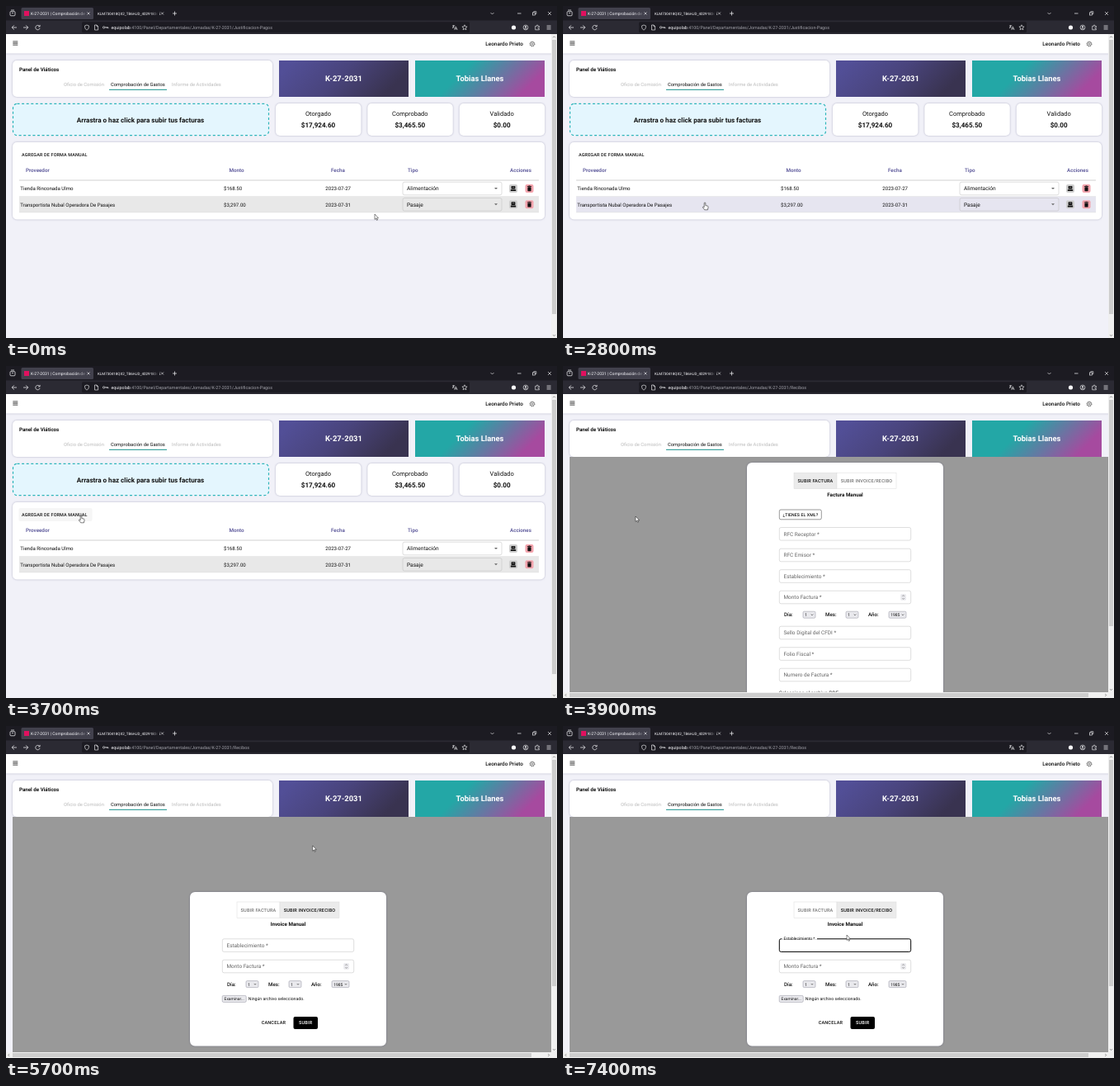
Animation, 668 px wide and 402 px high, one loop 8000 ms. Source, as an HTML page:

```html
<!DOCTYPE html>
<html lang="es">
<head>
<meta charset="utf-8">
<title>Panel de Viáticos</title>
<style>
html, body { margin: 0; width: 100%; height: 100%; overflow: hidden; background: #f1f1f8; }
svg { display: block; width: 100vw; height: 100vh; }
text { font-family: Roboto, Arial, sans-serif; text-rendering: geometricPrecision; }
.card { filter: drop-shadow(0 .4px 1px rgba(40, 40, 90, .32)); }
.caps { letter-spacing: .0285em; }
</style>
</head>
<body>
<svg id="stage" viewBox="0 0 668 402"></svg>
<script>
const LOOP = 8000, STEP = 100, FORM_AT = 3900, INVOICE_AT = 5700, FOCUS_AT = 6900;
const CODE = 'K-27-2031', INK = '#111', INDIGO = '#504c93', BAR = '#fbfbfe';
const stage = document.getElementById('stage');

// Pointer moves: start, end, target x, y and an optional bend point
const START = [447, 252];
const MOVES = [
  [0, 500, 443, 273, 446, 264],
  [700, 800, 442.5, 268.5],
  [900, 1600, 429, 272, 447, 262],
  [1900, 2800, 172, 238, 260, 330],
  [2800, 3400, 90, 183, 130, 200],
  [3500, 3700, 91, 181],
  [3800, 3900, 88, 182],
  [4100, 5000, 361, 150, 230, 215],
  [5000, 5300, 373, 140],
  [5600, 6300, 350.5, 228],
  [6300, 6500, 346, 259],
  [6500, 6700, 345, 264],
  [7000, 7400, 344, 253],
];

const clamp = v => Math.max(0, Math.min(1, v));
const smooth = v => v * v * (3 - 2 * v);

function pointerAt(t) {
  let [x, y] = START;
  for (const [t0, t1, ex, ey, bx = (x + ex) / 2, by = (y + ey) / 2] of MOVES) {
    if (t <= t0) break;
    const p = smooth(clamp((t - t0) / (t1 - t0))), q = 1 - p;
    x = q * q * x + 2 * p * q * bx + p * p * ex;
    y = q * q * y + 2 * p * q * by + p * p * ey;
  }
  return [x, y];
}

// Drawing helpers, each returns markup
const text = (x, y, s, size = 6.09, fill = INK, weight = 400, anchor = 'start', cls = '') =>
  `<text x="${x}" y="${y}" font-size="${size}" fill="${fill}" font-weight="${weight}" text-anchor="${anchor}" class="${cls}">${s}</text>`;
const mid = (x, y, s, size, fill, weight, cls) => text(x, y, s, size, fill, weight, 'middle', cls);
const rect = (x, y, w, h, r, fill, stroke = 'none', sw = .5, extra = '') =>
  `<rect x="${x}" y="${y}" width="${w}" height="${h}" rx="${r}" fill="${fill}" stroke="${stroke}" stroke-width="${sw}" ${extra}/>`;
const line = (d, stroke = BAR, sw = .7, fill = 'none') =>
  `<path d="${d}" fill="${fill}" stroke="${stroke}" stroke-width="${sw}" stroke-linejoin="round"/>`;
const ring = (x, y, r, stroke = BAR, sw = .6, fill = 'none', extra = '') =>
  `<circle cx="${x}" cy="${y}" r="${r}" fill="${fill}" stroke="${stroke}" stroke-width="${sw}" ${extra}/>`;
const card = (x, y, w, h, r = 5) => rect(x, y, w, h, r, '#fff', 'none', 0, 'class="card"');
const cross = (x, y, r) => line(`M${x - r} ${y - r}l${2 * r} ${2 * r}m0 ${-2 * r}l${-2 * r} ${2 * r}`, BAR, .6);
const chevron = (x, y, r, color, dir = 1) => line(`M${x - r} ${y - dir * r / 2}l${r} ${dir * r}l${r} ${-dir * r}`, color, .6);
const triangle = (x, y, r, color) => line(`M${x - r} ${y - r / 2}h${2 * r}l${-r} ${r}z`, 'none', 0, color);

const DEFS = `<defs>
<linearGradient id="dusk" x1="0" y1="0" x2="1" y2=".28"><stop offset=".1" stop-color="#524f97"/><stop offset=".55" stop-color="#49447c"/><stop offset="1" stop-color="#393350"/></linearGradient>
<linearGradient id="reef" x1="0" y1="0" x2="1" y2=".28"><stop offset=".42" stop-color="#23a7a6"/><stop offset="1" stop-color="#a64a9f"/></linearGradient>
<linearGradient id="fadeA"><stop offset="0" stop-color="#42414d" stop-opacity="0"/><stop offset=".8" stop-color="#42414d"/></linearGradient>
<linearGradient id="fadeB"><stop offset="0" stop-color="#1c1b22" stop-opacity="0"/><stop offset=".8" stop-color="#1c1b22"/></linearGradient>
</defs>`;

function browser(page) {
  const host = 'equipolab', path = `:4100/Panel/Departamentales/Jornadas/${CODE}/${page}`;
  return rect(0, 0, 668, 18, 0, '#1c1b22') + rect(0, 17.5, 668, 16.5, 0, '#2b2a33') +
    rect(5, 6.6, 6, 5.2, 1, 'none', BAR, .7) + line('M6 5h4M7 8.6h2') +
    rect(18.5, 2, 87.5, 14, 1.5, '#42414d') + rect(22, 6, 6, 6, 0, '#e0115f') +
    text(30, 10.9, `${CODE} | Comprobación de G`, 5, BAR) +
    rect(88, 4, 13, 10, 0, 'url(#fadeA)') + cross(100, 9, 1.5) +
    text(111, 10.9, 'KLM730418QX2_TB6HJD_402918365', 4.5, BAR) +
    rect(177, 4, 9, 10, 0, 'url(#fadeB)') + cross(189.5, 9, 1.5) +
    line('M202 9h5M204.5 6.5v5') + chevron(589.5, 9, 2, BAR) + line('M620 9h4.5') +
    rect(638.5, 8, 3, 3, 0, 'none', BAR, .6) + line('M639.8 7.9v-1.2h3v3h-1.2', BAR, .6) + cross(659, 9, 2) +
    line('M13 26H7.2m2.6-2.6L7.2 26l2.6 2.6M21 26h5.8m-2.6-2.6l2.6 2.6l-2.6 2.6') +
    line('M40.6 24.4a2.7 2.7 0 1 0 .5 2.4M41.1 22.9v2h-2') +
    rect(92, 19.3, 470, 13, 1.5, '#1c1b22') +
    line('M98 23l2.4.9v2q-.2 2.2-2.4 3.2q-2.2-1-2.4-3.2v-2z', BAR, .6) +
    line('M107.5 23h2.5l1.6 1.6v4.4h-4.1zM110 23v1.7h1.6', BAR, .6) +
    ring(118.6, 25.9, 1.2) + line('M119.9 25.9h4v1.3m-1.5-1.3v1') +
    text(127.5, 28.1, `<tspan fill="${BAR}">${host}</tspan>${path}`, 5.35, '#a3a3ab') +
    line('M541 24h3.4M542.7 23v1q0 2-1.7 3M541.7 25l2 2M543.7 29l1.7-4 1.7 4M544.4 27.7h2', BAR, .6) +
    line('M556 22.8l.9 2.1 2.2.2-1.7 1.5.5 2.2-1.9-1.2-1.9 1.2.5-2.2-1.7-1.5 2.2-.2z', BAR, .6) +
    ring(615.5, 26, 2.6, 'none', 0, BAR) +
    ring(630, 26, 2.9) + ring(630, 25.2, 1, 'none', 0, BAR) + line('M628.3 27.8q1.7-1.6 3.4 0') +
    line('M641.7 28.8v-4.4h1.6v-1q.8-1 1.5 0v1h1.6v1.6h-1q-1 .7 0 1.4h1v1.4z', BAR, .6) +
    line('M655.6 24h5M655.6 26h5M655.6 28h5');
}

function header() {
  const tab = (x, s, fill) => text(x, 97.1, s, 5.83, fill);
  return rect(0, 34, 668, 368, 0, '#f1f1f8') + card(0, 34, 668, 23.5, 0) +
    line('M8.3 42.8h6M8.3 44.3h6M8.3 45.8h6M8.3 47.3h6', '#444', .8) +
    text(627, 48, 'Leonardo Prieto', 6.4, INK, 500, 'end') +
    ring(638, 46, 2.4, '#444', .6) + ring(638, 46, 3, '#444', .7, 'none', 'stroke-dasharray="1.18"') + ring(638, 46, .9, '#444', .5) +
    card(8, 66, 315, 44) + text(16, 79.4, 'Panel de Viáticos', 6.2, INK, 600) +
    tab(70, 'Oficio de Comisión', '#bcbcbc') + tab(127, 'Comprobación de Gastos', INK) +
    tab(201, 'Informe de Actividades', '#bcbcbc') + rect(125, 100.8, 70, 1, 0, '#16918c') +
    rect(331, 66, 157, 44, 0, 'url(#dusk)') + mid(409.5, 91.3, CODE, 9.4, '#fff', 700) +
    rect(496, 66, 157, 44, 0, 'url(#reef)') + mid(574.5, 91.3, 'Tobias Llanes', 9.4, '#fff', 700);
}

const stat = (x, name, value) => card(x, 118, 103.5, 39) +
  mid(x + 51.5, 133, name, 7.5) + mid(x + 51.5, 147, value, 8.1, INK, 700);

function row(y, fill, cells, kind) {
  const c = y + 9.5, base = c + 2.2;
  return rect(16, y, 630, 19, 0, fill) + line(`M16 ${y + 19}h630`, '#d6d6d6', .5) +
    text(17.3, base, cells[0]) + text(264, base, cells[1]) + text(387.3, base, cells[2]) +
    rect(481, c - 7.8, 120, 15.6, 2, 'none', '#bdbdbd') + text(486, c + 2.3, kind, 6.6) +
    triangle(594, c, 2, '#666') +
    rect(610, c - 5, 10, 10, 2, '#cfcfcf') + rect(612.6, c - 3, 4.8, 3.6, .5, '#111') +
    rect(611.8, c + 1.2, 6.4, 1.9, .4, '#111') + line(`M613.8 ${c - 1.6}h2.4`, '#ccc', .5) +
    rect(629.5, c - 5, 10, 10, 2, '#f3a4ad') + rect(632.4, c - 1.7, 4.2, 4.9, .6, '#111') +
    rect(631.9, c - 2.9, 5.2, .8, 0, '#111') + rect(633.5, c - 3.5, 2, .8, 0, '#111');
}

function expenses(over) {
  const tint = '#e6e5f0', head = (x, s) => text(x, 201.4, s, 6.25, INDIGO, 500);
  const rows = [211.5, 230.8], hit = rows.map(y => over(16, y, 630, 19)), button = over(15.5, 172, 89, 16);
  const art = rect(8.5, 118.4, 310, 38.2, 5, '#e4f6fe', '#2db5ba', 1.2, 'stroke-dasharray="3 2.6"') +
    mid(163, 140.5, 'Arrastra o haz click para subir tus facturas', 8.1, INK, 700) +
    stat(327, 'Otorgado', '$17,924.60') + stat(438.3, 'Comprobado', '$3,465.50') + stat(549.7, 'Validado', '$0.00') +
    card(8, 165, 645, 93.5) + rect(15.5, 172, 89, 16, 2, button ? '#f6f6f6' : '#fff') +
    text(19, 182, 'AGREGAR DE FORMA MANUAL', 5.45, INK, 500, 'start', 'caps') +
    head(24, 'Proveedor') + head(270.5, 'Monto') + head(394, 'Fecha') + head(487, 'Tipo') + head(611, 'Acciones') +
    row(rows[0], hit[0] ? tint : '#fff', ['Tienda Rinconada Ulmo', '$168.50', '2023-07-27'], 'Alimentación') +
    row(rows[1], hit[1] ? tint : '#e8e8e8', ['Transportista Nubal Operadora De Pasajes', '$3,297.00', '2023-07-31'], 'Pasaje') +
    line('M16 211h630', '#bdbdbd', .7);
  return [art, button || hit[0] || hit[1] ? 'hand' : 'arrow'];
}

function field(c, label, hover = false, focus = 0) {
  const size = 6.45 * (1 - .25 * focus);
  return rect(262.3, c - 7.8, 159.4, 15.6, 2, '#fff', focus ? '#000' : hover ? '#222' : '#bdbdbd', focus ? 1 : .5) +
    (focus ? rect(265.5, c - 8.6, 42.5 * focus, 1.6, 0, '#fff') : '') +
    text(267.5, c + 2.3 - 8.8 * focus, label + ' *', size, focus ? '#000' : '#666');
}

const amount = c => field(c, 'Monto Factura') + rect(409.3, c - 3.8, 6.6, 7.6, 1.2, '#e9e9ed') +
  chevron(412.6, c - 1.8, 1.1, '#555', -1) + chevron(412.6, c + 1.8, 1.1, '#555');

const dates = c => [[268, 'Día:', 291, 15, 1], [318, 'Mes:', 343, 15, 1], [370, 'Año:', 395, 21, 1985]]
  .map(([x, name, sx, w, value]) => text(x, c + 2.2, name, 6.2, INK, 500) +
    rect(sx, c - 4, w, 8, 1.4, '#e9e9ed', '#8f8f9d', .5) + text(sx + 2.2, c + 1.9, value, 5) +
    chevron(sx + w - 4, c, 1.3, '#222')).join('');

function toggle(y, chosen, over) {
  const parts = [[280, 52, 306, 'SUBIR FACTURA'], [332, 72, 368, 'SUBIR INVOICE/RECIBO']];
  return parts.map(([x, w, cx, s], i) => {
    const on = i === chosen, hot = over(x, y, w, 19.5);
    const fill = on ? (hot ? '#dedede' : '#ebebeb') : hot ? '#f5f5f5' : '#fff';
    return rect(x, y, w, 19.5, 0, fill, '#dcdcdc') + mid(cx, y + 11.7, s, 5.55, on ? INK : '#757575', 500, 'caps');
  }).join('');
}

function invoiceForm(over) {
  return card(223, 117, 238, 290, 6) + toggle(129.2, 0, over) + mid(342, 158.3, 'Factura Manual', 6.26, INK, 700) +
    rect(262.3, 174, 51, 11.8, 1.8, '#fff', '#333') + mid(287.9, 181.8, '¿TIENES EL XML?', 5.1, INK, 500, 'caps') +
    field(203.3, 'RFC Receptor') + field(229, 'RFC Emisor') + field(254.5, 'Establecimiento') +
    amount(280) + dates(301.2) +
    field(323, 'Sello Digital del CFDI') + field(348.5, 'Folio Fiscal') + field(374, 'Numero de Factura') +
    text(262, 397.6, 'Seleccione el archivo PDF', 6.3, '#333');
}

function receiptForm(over, t) {
  const focus = smooth(clamp((t - FOCUS_AT + 100) / 200));
  return card(223, 201, 238, 186.5, 6) + toggle(213, 1, over) + mid(342, 242.3, 'Invoice Manual', 6.26, INK, 700) +
    field(265.6, 'Establecimiento', over(262, 257.8, 160, 15.6), focus) + amount(291) + dates(312.6) +
    rect(262.2, 326.4, 29, 8, 1.4, '#e9e9ed', '#8f8f9d', .5) + mid(276.7, 332.2, 'Examinar...', 4.95) +
    text(293.7, 332.4, 'Ningún archivo seleccionado.', 5.2) +
    mid(324.4, 361.4, 'CANCELAR', 5.55, INK, 500, 'caps') +
    rect(348.5, 352, 29.5, 15, 2, '#000') + mid(363.2, 361.4, 'SUBIR', 5.55, '#fff', 500, 'caps');
}

function scrollbars(form) {
  const end = form ? 395 : 402;
  return rect(661, 34, 7, 368, 0, '#f0f0f0') + rect(662, 41, 5, (form ? 315 : 373) - 41, 0, '#cdcdcd') +
    chevron(664.5, 37.5, 1.5, '#555', -1) + chevron(664.5, end - 3.2, 1.5, '#555') +
    (form ? rect(0, 395, 661, 7, 0, '#f0f0f0') + rect(8, 396, 629, 5, 0, '#cdcdcd') +
      line('M4.2 397l-1.5 1.5 1.5 1.5M657.2 397l1.5 1.5-1.5 1.5', '#555', .6) : '');
}

const POINTERS = {
  arrow: line('M0 0v6.4l1.5-1.3 1 2.3 1-.4-1-2.2h2z', '#111', .5, '#fff'),
  hand: line('M-.8 .8a.8 .8 0 0 1 1.6 0v2.7l2.6.7q.9.3.7 1.3l-.7 3.3h-3.7l-2.3-3q.2-1.1 1.2-.6l.6.5z', '#111', .55, '#fff'),
  beam: line('M-1.2-3.4h2.4M0-3.4v6.8M-1.2 3.4h2.4', '#111', .6),
};

function scene(t) {
  const [px, py] = pointerAt(t);
  const over = (x, y, w, h) => px >= x && px <= x + w && py >= y && py <= y + h;
  const form = t >= FORM_AT, receipt = t >= INVOICE_AT;
  let art, shape = 'arrow';
  if (!form) {
    [art, shape] = expenses(over);
  } else {
    art = rect(8, 110, 653, 285, 0, '#999') + (receipt ? receiptForm(over, t) : invoiceForm(over));
    if (over(280, receipt ? 213 : 129.2, 124, 19.5)) shape = 'hand';
    else if (receipt && over(262, 257.8, 160, 15.6)) shape = 'beam';
  }
  return DEFS + header() + art + scrollbars(form) + browser(form ? 'Recibos' : 'Justificacion-Pagos') +
    `<g transform="translate(${px} ${py})">${POINTERS[shape]}</g>`;
}

let shown = -1;
function frame(now) {
  const t = Math.floor(now % LOOP / STEP) * STEP;
  if (t !== shown) stage.innerHTML = scene(shown = t);
  requestAnimationFrame(frame);
}
requestAnimationFrame(frame);
</script>
</body>
</html>
```
